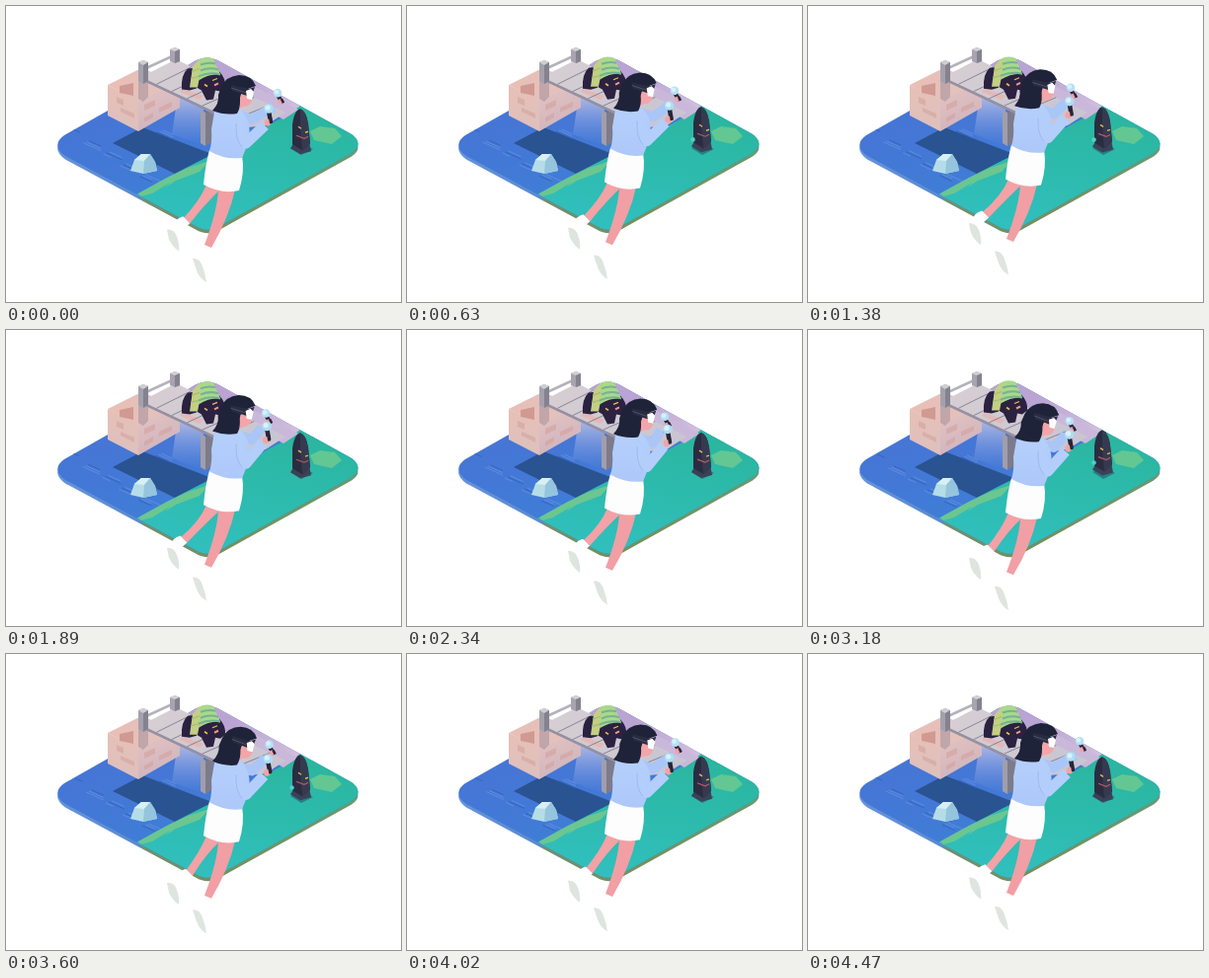
Write an HTML page that moves like this. It is 400 px wide and 300 px high and loops after 4.5 s.

```html
<!DOCTYPE html>
<html lang="en">
<head>
<meta charset="utf-8">
<title>Floating island</title>
<style>
html, body { margin: 0; width: 100%; height: 100%; overflow: hidden; background: #fff; }
svg { display: block; width: 400px; height: 300px; }
</style>
</head>
<body>
<svg viewBox="0 0 400 300">
  <defs>
    <linearGradient id="sea" x1="0" y1="0" x2=".4" y2="1">
      <stop offset="0" stop-color="#4d74d2"/><stop offset=".5" stop-color="#4477d6"/><stop offset="1" stop-color="#3b83d6"/>
    </linearGradient>
    <linearGradient id="grass" x1=".75" y1="0" x2=".4" y2="1">
      <stop offset="0" stop-color="#2ab59d"/><stop offset=".5" stop-color="#2dbbae"/><stop offset="1" stop-color="#31c0c0"/>
    </linearGradient>
    <linearGradient id="sky" x1="0" y1="0" x2="1" y2="0">
      <stop offset="0" stop-color="#b7a3d2"/><stop offset=".55" stop-color="#baa4d3"/><stop offset="1" stop-color="#d2bfdd"/>
    </linearGradient>
    <linearGradient id="rim" x1="0" y1="0" x2="1" y2="0">
      <stop offset="0" stop-color="#6594da"/><stop offset=".27" stop-color="#5a8ad0"/><stop offset=".29" stop-color="#6d8f72"/><stop offset=".6" stop-color="#74905f"/><stop offset="1" stop-color="#6a9a72"/>
    </linearGradient>
    <linearGradient id="haze" x1="0" y1="0" x2="0" y2="1">
      <stop offset="0" stop-color="#d9d3ea" stop-opacity=".75"/><stop offset="1" stop-color="#8fa6e4" stop-opacity="0"/>
    </linearGradient>
    <linearGradient id="brickT" x1="0" y1="0" x2="1" y2="0">
      <stop offset="0" stop-color="#e8bfb5"/><stop offset="1" stop-color="#e2c2c0"/>
    </linearGradient>
    <linearGradient id="brickL" x1="0" y1="0" x2="0" y2="1">
      <stop offset="0" stop-color="#e6c0b8"/><stop offset="1" stop-color="#dec0bd"/>
    </linearGradient>
    <linearGradient id="brickR" x1="0" y1="0" x2=".4" y2="1">
      <stop offset="0" stop-color="#e6c6c2"/><stop offset="1" stop-color="#d0b4be"/>
    </linearGradient>
    <linearGradient id="plank" x1="0" y1="0" x2="1" y2=".6">
      <stop offset="0" stop-color="#d8cfd3"/><stop offset="1" stop-color="#c9c6d2"/>
    </linearGradient>
    <linearGradient id="knit" x1="0" y1="0" x2="0" y2="1">
      <stop offset="0" stop-color="#b6d0fc"/><stop offset="1" stop-color="#adc8f9"/>
    </linearGradient>
    <path id="slab" d="M59 131L186 59Q202 47 218 57L350 130Q363 140 350 149L215 224Q204 230 192 223L60 152Q45 141 59 131Z"/>
    <clipPath id="land"><use href="#slab"/></clipPath>
  </defs>

  <use href="#slab" y="3.5" fill="url(#rim)"/>
  <g clip-path="url(#land)">
    <rect x="45" y="45" width="320" height="190" fill="url(#sea)"/>
    <path d="M174 90L200 103V142L168 130Z" fill="url(#haze)"/>
    <path d="M108 139L138 123L206 149L224 148L204 156L173 171Z" fill="#2a5392"/>
    <g id="waves" stroke-width=".9" stroke-linecap="round"></g>
    <path d="M132 191L163 174L192 159L228 141L284 111L296 99L370 130V240H180Z" fill="url(#grass)"/>
    <path d="M134 190L163 174L184 164L206 157L196 168L172 177L161 184L166 179L148 190L137 193Z" fill="#6cc690"/>
    <path d="M308 127L318 122L333 124L340 132L330 140L312 136Z" fill="#63c793"/>
    <path d="M150 38L222 50L298 101L281 114L180 64Z" fill="url(#sky)"/>
    <path d="M239 75L296 105L281 115L238 91Z" fill="#cab8da"/>
  </g>

  <path d="M126 167L130 156L137 150L146 150L151 158L153 167L139 170Z" fill="#b5dde8"/>
  <path d="M130 156L137 150L146 150L140 157Z" fill="#d8f0f3"/>
  <path d="M140 157L146 150L151 158L153 167L139 170Z" fill="#94c5dd"/>

  <path d="M103 80L137 63L176 78L134 97Z" fill="url(#brickT)"/>
  <path d="M103 80L134 96V127L103 111Z" fill="url(#brickL)"/>
  <path d="M134 96L176 77V103L134 127Z" fill="url(#brickR)"/>
  <path d="M115 81L129 78V91L115 88Z" fill="#d09a92"/>
  <g fill="#d39d98" opacity=".5">
    <path d="M112 92L119 95V101L112 98ZM116 103L130 109V114L116 107Z"/>
    <path d="M140 100L151 95V101L140 106ZM155 103L168 97V102L155 108ZM140 113L149 108V113L140 118Z"/>
  </g>

  <path d="M197 105L202 108V142L197 139Z" fill="#a19eac"/>
  <path d="M202 108L210 105V137L202 142Z" fill="#7d7b8b"/>
  <path d="M134 72L144 77V92L139 97L134 94Z" fill="#a8959f" opacity=".6"/>
  <path d="M137 72L245 122V126L137 75Z" fill="#9490a2"/>
  <path d="M137 72L172 54L283 108L263 121L245 123Z" fill="url(#plank)"/>
  <path d="M178 84L200 91L196 95L176 87Z" fill="#e9b3ad" opacity=".8"/>
  <g id="seams" stroke="#7f7c8e" stroke-width=".9"></g>
  <path d="M143 61L167 50V53L143 64Z" fill="#b5b2bc"/>
  <path d="M134 57L139 55L144 57V76L139 79L134 76Z" fill="#a4a1ad"/>
  <path d="M134 57L139 55L144 57L139 60Z" fill="#d0ced3"/>
  <path d="M139 60L144 57V76L139 79Z" fill="#858290"/>
  <path d="M166 44L171 42L176 44V56L171 58L166 56Z" fill="#a7a4af"/>
  <path d="M166 44L171 42L176 44L171 46Z" fill="#d3d0d5"/>
  <path d="M171 46L176 44V56L171 58Z" fill="#858290"/>

  <g id="beast">
    <path d="M178 84Q177 69 184 63L192 62L193 83L186 85Z" fill="#2b2140"/>
    <path d="M193 72L216 66Q223 73 222 82L217 86L212 85L210 94L203 95L198 85L193 82Z" fill="#2b2140"/>
    <path d="M186 82L189 61L195 54L199 56L194 82Z" fill="#c3cf83"/>
    <path d="M195 54Q202 50 210 53L217 69Q206 68 195 75L197 58Z" fill="#a9d98a"/>
    <path d="M197 59Q205 56 212 58M197 65Q206 61 215 64M195 71Q206 66 217 69" fill="none" stroke="#76b293" stroke-width="2"/>
    <path d="M188 66L196 63M187 73L195 71" stroke="#a5bc74" stroke-width="1.2"/>
    <path d="M201 79L204 81" stroke="#e3c256" stroke-width="1.6"/>
    <path d="M211 80L215 78" stroke="#f09a86" stroke-width="2"/>
    <path d="M209 75L214 73" stroke="#e3c256" stroke-width="1.2"/>
  </g>

  <path d="M288 144L298 139L311 145L299 151Z" fill="#258088"/>
  <g id="totem">
    <path d="M288 143L293 135L307 136L309 146L298 149Z" fill="#3b4258"/>
    <path d="M290 139V119Q292 104 298 103Q304 105 306 118L308 138L300 145Z" fill="#2a2d42"/>
    <path d="M298 103Q304 105 306 118L308 138L300 145L298 123Z" fill="#353a50"/>
    <path d="M296 121L299 123M303 127L306 126" stroke="#e6b452" stroke-width="1.4"/>
    <path d="M294 130L302 133L306 131" fill="none" stroke="#bd5964" stroke-width="1.1"/>
  </g>
  <circle id="spark" cx="289.5" cy="135" r="2.3" fill="#52cfc8"/>

  <path id="soleL" d="M163 226Q170 225 173 233Q176 241 175 248Q169 244 165 236Z" fill="#dee5df"/>
  <path id="soleR" d="M189 256Q196 255 199 264Q202 272 203 280Q196 276 193 268Z" fill="#dee5df"/>
  <path id="legL" fill="#f3a2a6"/>
  <path id="legR" fill="#f19fa4"/>
  <path id="sockL" fill="#fff"/>

  <g id="body">
    <path id="armBack" fill="none" stroke="#a9c6f7" stroke-width="10" stroke-linejoin="round"/>
    <g id="padBack">
      <path d="M0 2L5 10" stroke="#272638" stroke-width="4"/>
      <circle r="4.3" fill="#b5e0f3"/><circle cx="-1" cy="-1" r="2.3" fill="#d8f1fa"/>
      <ellipse cx="2.6" cy="8.5" rx="2.4" ry="2.6" fill="#f3a2a6"/>
      <path d="M4 6L6 10" stroke="#272638" stroke-width="2.5"/>
    </g>
    <path d="M206 146Q221 154 239 151Q242 168 236 187Q218 191 200 181Q202 160 206 146Z" fill="#fdfdfd"/>
    <path d="M211 107Q225 99 238 106Q249 116 246 137L239 154Q221 156 206 147Q209 138 208 125Z" fill="url(#knit)"/>
    <path id="armFront" fill="none" stroke="#b3cefb" stroke-width="11" stroke-linejoin="round"/>
    <path d="M233 119Q232 135 239 143" fill="none" stroke="#98b5eb" stroke-width=".8"/>
    <g id="padFront">
      <path d="M0 2L2 14" stroke="#272638" stroke-width="4.5"/>
      <circle r="4.8" fill="#aedcf2"/><circle cx="-1" cy="-1" r="2.6" fill="#d8f1fa"/>
      <ellipse cx="-1" cy="14" rx="3.2" ry="3.5" fill="#f3a2a6"/>
      <path d="M1.5 9L2.5 15" stroke="#272638" stroke-width="3"/>
    </g>
    <g id="head">
      <path d="M233 84L249 85L249 96Q247 102 240 102L233 105Z" fill="#f3a5a9"/>
      <path d="M218 82Q223 71 236 70Q249 70 253 81L242 85Q236 89 237 97Q237 104 234 109Q221 111 209 106Q216 99 215 90Z" fill="#1f2339"/>
      <path d="M228 80L246 84L252 82L250 88L244 91L229 86Z" fill="#2a2d42"/>
      <path d="M243 86L248 84L251 87L249 95L244 94Z" fill="#fff"/>
      <path d="M228 83L243 88" stroke="#525568" stroke-width=".9"/>
    </g>
  </g>
</svg>
<script>
const LOOP = 4500;
const $ = id => document.getElementById(id);
const set = (id, name, value) => $(id).setAttribute(name, value);
const move = (id, x, y, turn = '') => set(id, 'transform', `translate(${x} ${y}) ${turn}`);
const ease = u => (1 - Math.cos(Math.PI * u)) / 2;

// Eased path through [time, value] keys, with p wrapped into 0..1.
function track(p, ...keys) {
  p = (p + 1) % 1;
  const i = keys.findIndex(key => key[0] > p);
  const [t0, v0] = keys[i - 1];
  const [t1, v1] = keys[i];
  return v0 + (v1 - v0) * ease((p - t0) / (t1 - t0));
}

// Rise, sink, and return to rest.
const hover = (p, up, down) => track(p, [0, 0], [.3, -up], [.73, down], [1, 0]);

function addLine(parent, stroke, x1, y1, x2, y2) {
  const line = document.createElementNS('http://www.w3.org/2000/svg', 'line');
  Object.entries({ stroke, x1, y1, x2, y2 }).forEach(([k, v]) => line.setAttribute(k, v));
  $(parent).append(line);
}

// Bridge boards run across its two long edges.
for (let i = 1; i < 7; i++) {
  const u = i / 7;
  addLine('seams', '#7f7c8e', 137 + 108 * u, 72 + 51 * u, 172 + 111 * u, 54 + 54 * u);
}

// Scattered ripples on the water.
for (let i = 0; i < 16; i++) {
  const x = 68 + (i * 37) % 94;
  const y = 125 + (i * 23) % 57;
  const len = 7 + (i * 5) % 11;
  addLine('waves', i % 3 ? '#628fe0' : '#3563b8', x, y, x + len, y + len * .45);
}

function draw(time) {
  const p = (time % LOOP) / LOOP;
  const a = p * Math.PI * 2;
  const bob = hover(p, 5.5, 4);
  const footL = hover(p - .05, 6, 6);
  const footR = hover(p, 7.5, 4);
  const beat = Math.cos(2 * a + .4);

  move('body', 0, bob);
  move('head', 0, 0, `rotate(${hover(p, 2, 3)} 229 105)`);
  move('soleL', 0, footL);
  move('soleR', 0, footR);

  const hipY = 181 + bob;
  const ankX = 180 + footL * .5;
  const ankL = 217 + (bob + footL) / 2;
  const ankR = 245 + footR * .8;
  set('legL', 'd', `M203 ${hipY}L217 ${hipY + 5}Q202 ${hipY + 19} ${ankX + 6} ${ankL + 3}L${ankX - 1} ${ankL - 2}Q196 ${hipY + 17} 203 ${hipY}Z`);
  set('legR', 'd', `M215 ${hipY + 5}L232 ${hipY + 5}Q226 ${hipY + 33} 208 ${ankR}L201 ${ankR - 3}Q214 ${hipY + 27} 215 ${hipY + 5}Z`);
  set('sockL', 'd', `M${ankX - 1} ${ankL - 4}L${ankX + 6} ${ankL + 3}L${ankX - 2} ${ankL + 10}L${ankX - 11} ${ankL + 6}Q${ankX - 9} ${ankL - 2} ${ankX - 1} ${ankL - 4}Z`);

  const bx = track(p, [0, 275], [.3, 266], [.52, 261], [.73, 265], [1, 275]);
  const by = 88.3;
  const fx = track(p, [0, 266], [.52, 264], [1, 266]);
  const fy = track(p, [0, 104], [.52, 101], [1, 104]);
  move('padBack', bx, by);
  move('padFront', fx, fy);
  set('armBack', 'd', `M234 110L249 115L${bx - 4} ${by + 14}`);
  set('armFront', 'd', `M231 114L243 139L${fx - 4} ${fy + 17}`);

  move('beast', 0, .5 * beat);
  move('totem', 0, 1.4 * beat);
  move('spark', 0, 1.5 + 2 * beat);
  set('spark', 'opacity', Math.max(0, Math.min(1, -beat * 2.5)));
  move('waves', -2.5 * Math.sin(a), -1.1 * Math.sin(a));
}

const start = performance.now();
function tick() {
  draw(performance.now() - start);
  requestAnimationFrame(tick);
}
tick();
</script>
</body>
</html>
```
